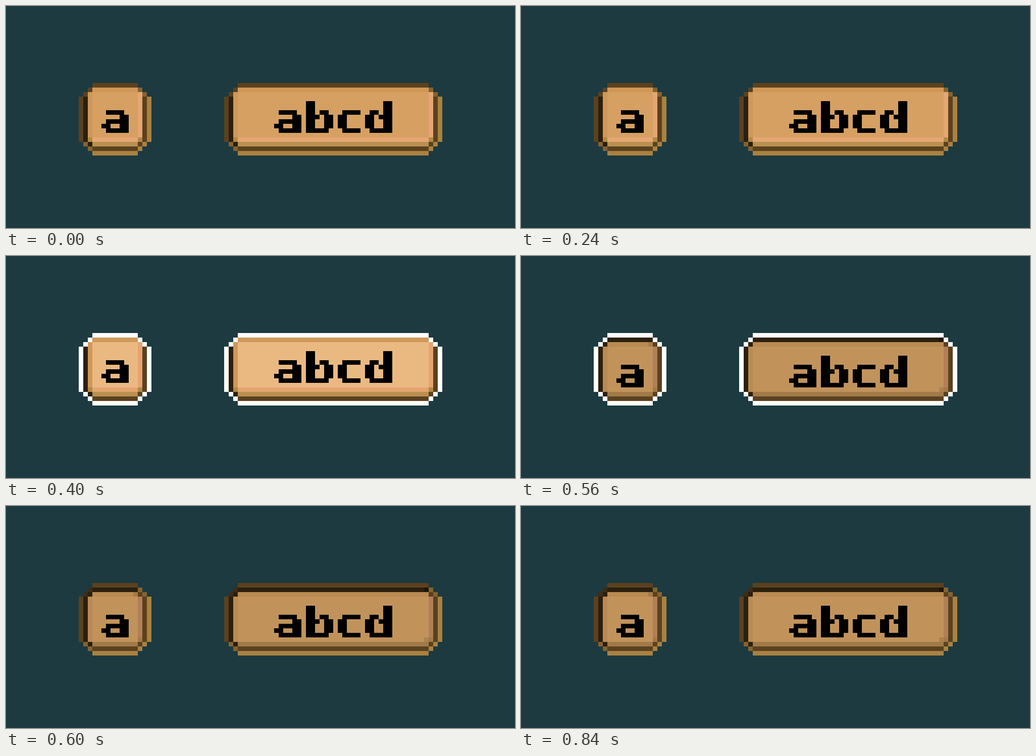
An HTML page with a canvas for the animation above (1 s loop, 1120 by 490 pixels).

```html
<!DOCTYPE html>
<html>
<head>
<meta charset="utf-8">
<title>Pixel keys</title>
<style>
html, body { margin: 0; height: 100%; overflow: hidden; background: #1c3a40; }
canvas { display: block; }
</style>
</head>
<body>
<canvas id="stage" width="1120" height="490"></canvas>
<script>
const ctx = document.getElementById('stage').getContext('2d');
const CELL = 10, TOP = 17, HEIGHT = 16;
const DARK = '#2c1f0e', BROWN = '#5b411f', MID = '#856330', GOLD = '#a98240', WHITE = '#ffffff';

const glyphs = {
  a: ['', '', ' ####', '    ##', ' #####', '##  ##', ' #####'],
  b: ['##', '##', '## ##', '### ##', '##  ##', '##  ##', '#####'],
  c: ['', '', ' ####', '##', '##', '##', ' ####'],
  d: ['    ##', '    ##', ' ## ##', '## ###', '##  ##', '##  ##', ' #####']
};
const keys = [
  { x: 16, w: 16, text: 'a', textX: [21] },
  { x: 48, w: 48, text: 'abcd', textX: [59, 66, 73, 79] }
];

function box(color, x, y, w = 1, h = 1) {
  ctx.fillStyle = color;
  ctx.fillRect(x * CELL, y * CELL, w * CELL, h * CELL);
}

function drawKey(key, lit, down) {
  const wide = key.w > HEIGHT, r = key.w - 1, span = key.w - 6;
  const put = (color, x, y, w, h) => box(color, key.x + x, TOP + y, w, h);
  const edge = color => lit ? WHITE : color;

  // Outline: four sides, then two steps at each corner
  put(edge(BROWN), 3, 0, span, 1);
  put(edge(GOLD), 3, 15, span, 1);
  put(edge(BROWN), 0, 3, 1, 10);
  put(edge(GOLD), r, 3, 1, 10);
  const topLeft = edge(down ? '#3f2c16' : BROWN);
  put(topLeft, 2, 1);
  put(topLeft, 1, 2);
  put(edge(MID), r - 2, 1);
  put(edge(MID), r - 1, 2);
  put(edge(MID), 1, 13);
  put(edge(MID), 2, 14);
  put(edge(GOLD), r - 1, 13);
  put(edge(GOLD), r - 2, 14);

  // Side walls
  put(DARK, 1, 3, 1, 10);
  put(DARK, 2, 13);
  put(BROWN, r - 1, 3, 1, 10);
  put(BROWN, r - 2, 13);
  put(BROWN, 3, 14, span, 1);

  if (down) {
    put(DARK, 3, 1, span, 1);
    put(DARK, 2, 2);
    put(BROWN, r - 2, 2);
    put('#c1935b', 3, 3, span, 10);
    put('#b98b52', 3, 2, span, 1);
    put('#b98b52', 2, 3, 1, 10);
    put('#b17f58', r - 2, 3, 1, 9);
    put('#a17a48', r - 2, 12);
    put('#a17a48', 3, 13, span, 1);
    if (wide) {
      put('#1f1508', r - 3, 1);
      put('#ac8250', r - 3, 12);
    } else {
      put('#a57c45', r - 3, 2);
    }
  } else {
    const pink = lit ? '#e5a470' : '#e5a673';
    put(lit ? '#eab982' : '#d5a062', 3, 2, span, 10);
    put('#cf9858', 3, 1, span, 1);
    put('#cf9858', 2, 2, 1, 10);
    put(pink, r - 2, 2, 1, 10);
    put(pink, 3, 12, span, 1);
    put('#b08a44', 2, 12);
    put('#b08a44', r - 2, 12);
    put('#b9914f', 3, 13, span, 1);
  }

  [...key.text].forEach((letter, i) => {
    glyphs[letter].forEach((row, y) => {
      [...row].forEach((dot, x) => {
        if (dot === '#') box('#000', key.textX[i] + x, 21 + y + down);
      });
    });
  });
}

function draw(now) {
  const t = now % 1000;
  const lit = t >= 400 && t < 600;
  const down = t >= 500 ? 1 : 0;
  box('#1c3a40', 0, 0, 112, 49);
  for (const key of keys) drawKey(key, lit, down);
}

function loop() {
  draw(performance.now());
  requestAnimationFrame(loop);
}
loop();
</script>
</body>
</html>
```
